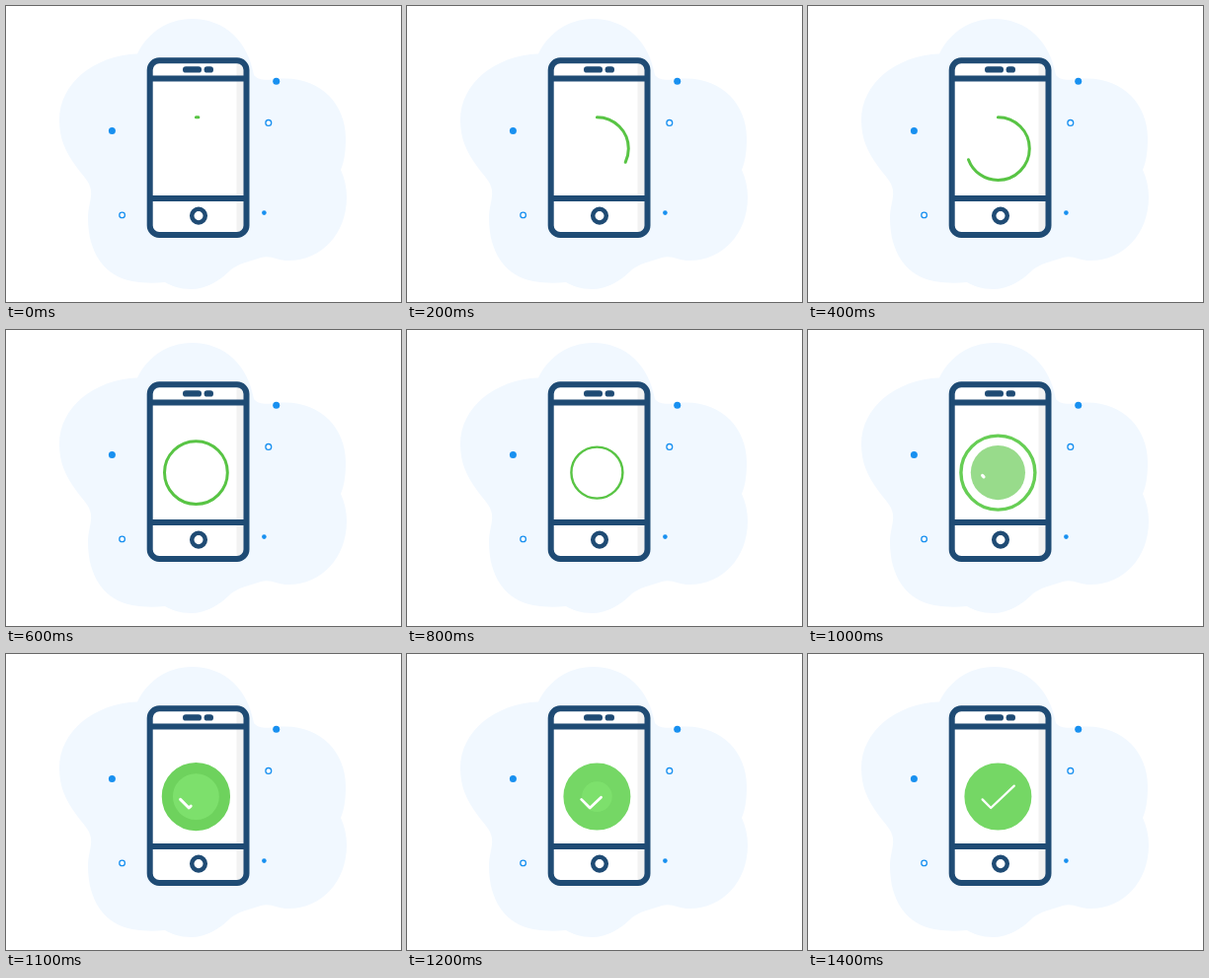
Animation of 400x300 px, one loop 1600 ms. Source, as an HTML page:

```html
<!DOCTYPE html>
<html lang="en">
<head>
<meta charset="utf-8">
<title>Phone check</title>
<style>
html, body { margin: 0; width: 100%; height: 100%; overflow: hidden; background: #fff; }
svg { display: block; width: 100vw; height: 100vh; }
</style>
</head>
<body>
<svg viewBox="0 0 400 300" fill="none">
  <path fill="#f1f8ff" d="M54 116C54 78 90 50 133 48.5C143 28 163 13 188 13C222 13 245 36 251 70C256 76 264 75 275 74C316 70 344 98 344 134C344 146 343 156 339 166C343 175 345 184 345 194C345 230 320 258 286 258C275 258 268 252 258 255C246 259 236 261 228 267C216 279 203 287 187 287C176 287 168 284 161 280C150 281 140 281 128 279C100 274 83 250 83 215C83 203 87 196 86 187C85 178 78 172 72 164C60 148 54 134 54 116Z"/>
  <g fill="#1890f0">
    <circle cx="107.4" cy="126.5" r="3.5"/>
    <circle cx="273.7" cy="76.2" r="3.5"/>
    <circle cx="261.4" cy="209.6" r="2.3"/>
  </g>
  <g fill="#fff" stroke="#1890f0" stroke-width="1.3">
    <circle cx="265.8" cy="118.4" r="2.9"/>
    <circle cx="117.6" cy="211.9" r="2.8"/>
  </g>
  <rect x="145.7" y="55.3" width="97.8" height="176.7" rx="9" fill="#fff"/>
  <path fill="#f2f2f2" d="M233.5 56H242V231H233.5Z"/>
  <g stroke="#1f4b74" stroke-width="6">
    <rect x="145.7" y="55.3" width="97.8" height="176.7" rx="9.5"/>
    <path d="M145 73.4H244M145 195.1H244"/>
    <circle cx="195" cy="212.6" r="6.8" stroke-width="4.5"/>
  </g>
  <g fill="#1f4b74">
    <rect x="179" y="61.2" width="19" height="6.4" rx="3.2"/>
    <rect x="200.6" y="61.2" width="9.4" height="6.4" rx="3.2"/>
  </g>
  <g transform="translate(192.4 144.6)">
    <circle id="disc"/>
    <circle id="ring" transform="rotate(-90)" stroke-linecap="round"/>
    <path id="tick" d="M-15.8 2.8L-7.2 11.4L16.4 -11" pathLength="100" stroke="#fff" stroke-linecap="round" stroke-linejoin="round"/>
  </g>
</svg>
<script>
const LOOP = 1600, STEP = 100, LAST = 14;
const GREEN = [88, 196, 68], PALE = [152, 219, 139], BRIGHT = [125, 224, 108], FINAL = [117, 215, 101];
const [disc, ring, tick] = ["disc", "ring", "tick"].map(id => document.getElementById(id));

const ramp = (s, from, to) => Math.min(1, Math.max(0, (s - from) / (to - from)));
const mix = (a, b, k) => a + (b - a) * k;
const easeOut = k => 1 - (1 - k) ** 3;
const gentle = k => k - 0.025 * Math.sin(2 * Math.PI * k);
const blend = (a, b, k) => `rgb(${a.map((v, i) => Math.round(mix(v, b[i], k))).join(",")})`;

function set(el, attrs) {
  for (const name in attrs) el.setAttribute(name, attrs[name]);
}

function draw(ms) {
  // The picture moves in held steps.
  const s = Math.min(LAST, Math.floor((ms % LOOP) / STEP));
  const shrink = ramp(s, 6, 8), swell = ramp(s, 8, 10), fill = ramp(s, 10, LAST);

  const outer = 33.4 - 6.2 * shrink + 12 * swell - 5.2 * easeOut(ramp(s, 10, 12));
  const width = mix(3 - 0.6 * shrink + swell, outer, fill);
  const r = outer - width / 2;
  const sweep = mix(4.5, 360, gentle(ramp(s, 0, 6))) * Math.PI / 180;
  set(ring, {
    r,
    stroke: blend(GREEN, FINAL, ramp(s, 8, 12)),
    "stroke-width": width,
    "stroke-dasharray": s < 6 ? `${r * sweep} 999` : "none"
  });

  set(disc, {
    r: 27.6 * swell,
    fill: blend(PALE, BRIGHT, ramp(s, 10, 11)),
    opacity: swell
  });

  const drawn = 100 * ramp(s, 9.85, 13.3);
  set(tick, {
    "stroke-width": 3.2 - fill,
    "stroke-dasharray": `${drawn} 200`,
    visibility: drawn > 0 ? "visible" : "hidden"
  });
}

const start = performance.now();
function loop() {
  draw(performance.now() - start);
  requestAnimationFrame(loop);
}
loop();
</script>
</body>
</html>
```
